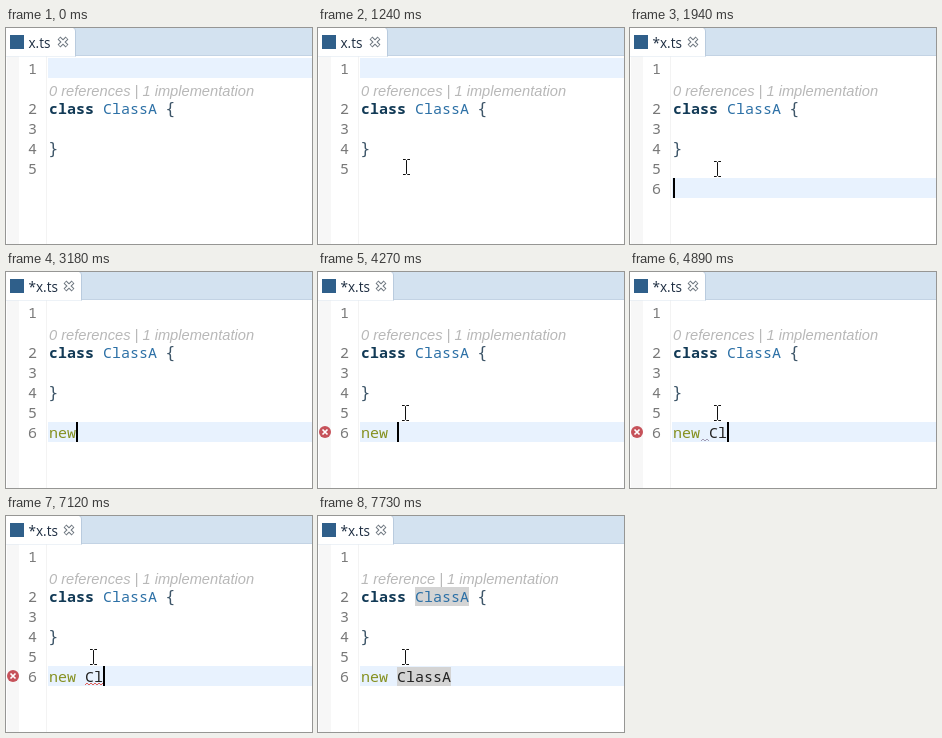
Animation, 306 px wide and 216 px high, one loop 8000 ms. Source, as an HTML page:

```html
<!DOCTYPE html>
<html lang="en">
<head>
<meta charset="utf-8">
<title>Completing a class name</title>
<style>
  html, body { margin: 0; width: 100%; height: 100%; overflow: hidden; background: #fff; }
  svg { display: block; width: 306px; height: 216px; }
  text { white-space: pre; }
  .code { font: 15px "Noto Sans Mono", "DejaVu Sans Mono", monospace; fill: #222; }
  .brace { font: 16px "DejaVu Sans Mono", monospace; fill: #3d5568; }
  .num { fill: #787878; }
  .ui { font: 14.4px "Open Sans", "Noto Sans", sans-serif; fill: #111; }
  .lens { font: italic 14.67px "Liberation Sans", Arial, sans-serif; fill: #b8b8b8; }
  .bold { font-weight: 700; }
</style>
</head>
<body>
<svg viewBox="0 0 306 216">
  <rect width="306" height="216" fill="#fff"/>
  <rect y="28" x="1" width="12" height="188" fill="#f7f7f7"/>
  <path d="M40.5 28V216" stroke="#f3f3f3"/>

  <rect width="306" height="27" fill="#d3e2f0"/>
  <path d="M0 27.5H306" stroke="#c3d3e4"/>
  <path id="tabEdge" fill="#fff" stroke="#b9cbde"/>
  <rect x="4" y="7" width="14" height="14" fill="#2f5f8a"/>
  <text id="tabName" class="ui" x="22.5" y="19.5" style="font-size:13.6px"></text>
  <g id="close" fill="none">
    <path d="M-4-4L4 4M4-4L-4 4" stroke="#6c757e" stroke-width="4"/>
    <path d="M-3.5-3.5L3.5 3.5M3.5-3.5L-3.5 3.5" stroke="#fff" stroke-width="2"/>
  </g>

  <rect id="line" x="42" width="264" height="20" fill="#e8f2fe"/>
  <g id="marks" fill="#d4d4d4">
    <rect x="97" y="71" width="54" height="19"/>
    <rect x="79" y="151" width="54" height="19"/>
  </g>
  <g id="numbers"></g>
  <text id="lens" class="lens" x="43" y="68"></text>
  <text class="code bold" x="43" y="86" style="fill:#123a56">class</text>
  <text class="code" x="97" y="86" style="fill:#2c70a6">ClassA</text>
  <text class="brace" x="159.5" y="86">{</text>
  <text class="brace" x="42.5" y="126">}</text>
  <text id="keyword" class="code" x="43" y="166"></text>
  <text id="name" class="code" x="79" y="166"></text>
  <path id="squiggle" fill="none"/>
  <g id="error">
    <circle cx="7" cy="160" r="6" fill="#c6525a"/>
    <path d="M4.5 157.5l5 5m0-5l-5 5" stroke="#fff" stroke-width="1.7"/>
  </g>
  <rect id="caret" width="2" height="20" fill="#000"/>

  <g id="popup">
    <rect x="94" y="168" width="230" height="70" rx="6" fill="#000" opacity=".06"/>
    <rect x="97.5" y="171.5" width="230" height="70" rx="5" fill="#f6f7f9" stroke="#5c6166" stroke-width="1.6"/>
    <rect x="103.5" y="177.5" width="220" height="60" fill="#fff" stroke="#8a8f94"/>
    <rect id="pick" x="107.5" width="180" height="20" rx="2.5" fill="#f0f0f1" stroke="#d6d6d8"/>
    <rect x="111.5" y="184.5" width="12" height="12" fill="#fffaf0" stroke="#8f7a4c"/>
    <path d="M112 187h11" stroke="#efb04a" stroke-width="3"/>
    <path d="M114 191.5h7m-7 3h7" stroke="#7f93b0"/>
    <text class="ui" x="127" y="196">class - class declaration</text>
    <circle cx="117.5" cy="214" r="5.5" fill="#eba261" stroke="#b06a30"/>
    <circle cx="118" cy="213" r="2" fill="#fff3dd"/>
    <text class="ui" x="127" y="219.5"><tspan class="bold">cl</tspan>ass</text>
  </g>

  <path id="mouse" d="M-3.5-7.5H-1L0-6.5 1-7.5H3.5M0-6.5V6.5M-3.5 7.5H-1L0 6.5 1 7.5H3.5" fill="none" stroke="#111"/>
</svg>
<script>
const LOOP = 8000;
const $ = id => document.getElementById(id);
const set = (id, attrs) => { for (const k in attrs) $(id).setAttribute(k, attrs[k]); };
const show = (id, on) => set(id, { visibility: on ? 'visible' : 'hidden' });
const write = (id, s) => { if ($(id).textContent !== s) $(id).textContent = s; };

// Value of the last [time, value] pair already reached.
const at = (t, steps) => steps.reduce((v, [from, value]) => t >= from ? value : v, steps[0][1]);

const lineTop = n => n === 1 ? 30 : 30 + n * 20;
const numbers = [1, 2, 3, 4, 5, 6].map(n => {
  const el = document.createElementNS('http://www.w3.org/2000/svg', 'text');
  el.setAttribute('class', 'code num');
  el.setAttribute('x', 22);
  el.setAttribute('y', lineTop(n) + 16);
  el.textContent = n;
  return $('numbers').appendChild(el);
});

function wave(from, to) {
  let d = `M${from} 169`;
  for (let x = from + 2, up = true; x <= to; x += 2, up = !up) d += `L${x} ${up ? 167 : 169}`;
  return d;
}

function drawMouse(t) {
  const step = Math.min(13, Math.floor((t - 260) / 75));
  const p = step / 13;
  const moving = t < 1870;
  const x = moving ? Math.floor(184 - 96 * p) + 0.5 : 87.5;
  const y = moving ? Math.round(139 + 70 * (1 - p) ** 2) : 141;
  set('mouse', { transform: `translate(${x} ${y})` });
  show('mouse', at(t, [[0, false], [260, true], [2870, false], [4270, true], [4490, false], [4890, true]]));
}

function drawTab(t) {
  const dirty = t >= 1940;
  const shift = dirty ? 6 : 0;
  const edge = 69.5 + shift;
  write('tabName', dirty ? '*x.ts' : 'x.ts');
  $('tabName').style.fill = at(t, [[0, '#1c2c40'], [1320, '#1d5a2c'], [1940, '#1c2c40']]);
  set('tabEdge', { d: `M-5 -.5H${edge - 3}Q${edge} -.5 ${edge} 3V29H-5Z`, 'clip-path': 'inset(0 0 1px 0)' });
  set('close', { transform: `translate(${57 + shift} 14)` });
}

function drawCode(t) {
  const row = at(t, [[0, 1], [1320, 5], [1940, 6]]);
  const keyword = at(t, [[0, ''], [2870, 'n'], [2950, 'ne'], [3180, 'new']]);
  const name = at(t, [[0, ''], [4490, 'C'], [4730, 'Cl'], [7270, 'ClassA']]);
  const typed = t < 3330 ? keyword.length : 4 + name.length;

  set('line', { y: lineTop(row) });
  numbers[5].setAttribute('visibility', row === 6 ? 'visible' : 'hidden');
  write('lens', (t < 7270 ? '0 references' : '1 reference') + ' | 1 implementation');
  write('keyword', keyword);
  write('name', name);
  $('keyword').style.fill = t < 3180 ? '#222' : '#859020';

  set('caret', { x: 43 + 9 * typed, y: lineTop(row) });
  show('caret', at(t, [
    [0, false], [1320, true], [1870, false], [1940, true], [2490, false], [2870, true],
    [3790, false], [4270, true], [5410, false], [5720, true], [6260, false], [6790, true], [7730, false]
  ]));

  const late = t >= 5410;
  set('squiggle', { d: late ? wave(79, 97) : wave(71, 79), stroke: late ? '#e0605a' : '#a09ab2' });
  show('squiggle', t >= 4350 && t < 7270);
  show('error', t >= 4270 && t < 7660);
  show('marks', t >= 7660);
}

function drawPopup(t) {
  set('popup', { display: t >= 5410 && t < 7120 ? 'inline' : 'none' });
  set('pick', { y: at(t, [[0, 181.5], [6410, 203.5], [6790, 225.5]]) });
}

function render(t) {
  drawTab(t);
  drawCode(t);
  drawPopup(t);
  drawMouse(t);
}

const start = performance.now();
function tick() {
  render((performance.now() - start) % LOOP);
  requestAnimationFrame(tick);
}
tick();
</script>
</body>
</html>
```
